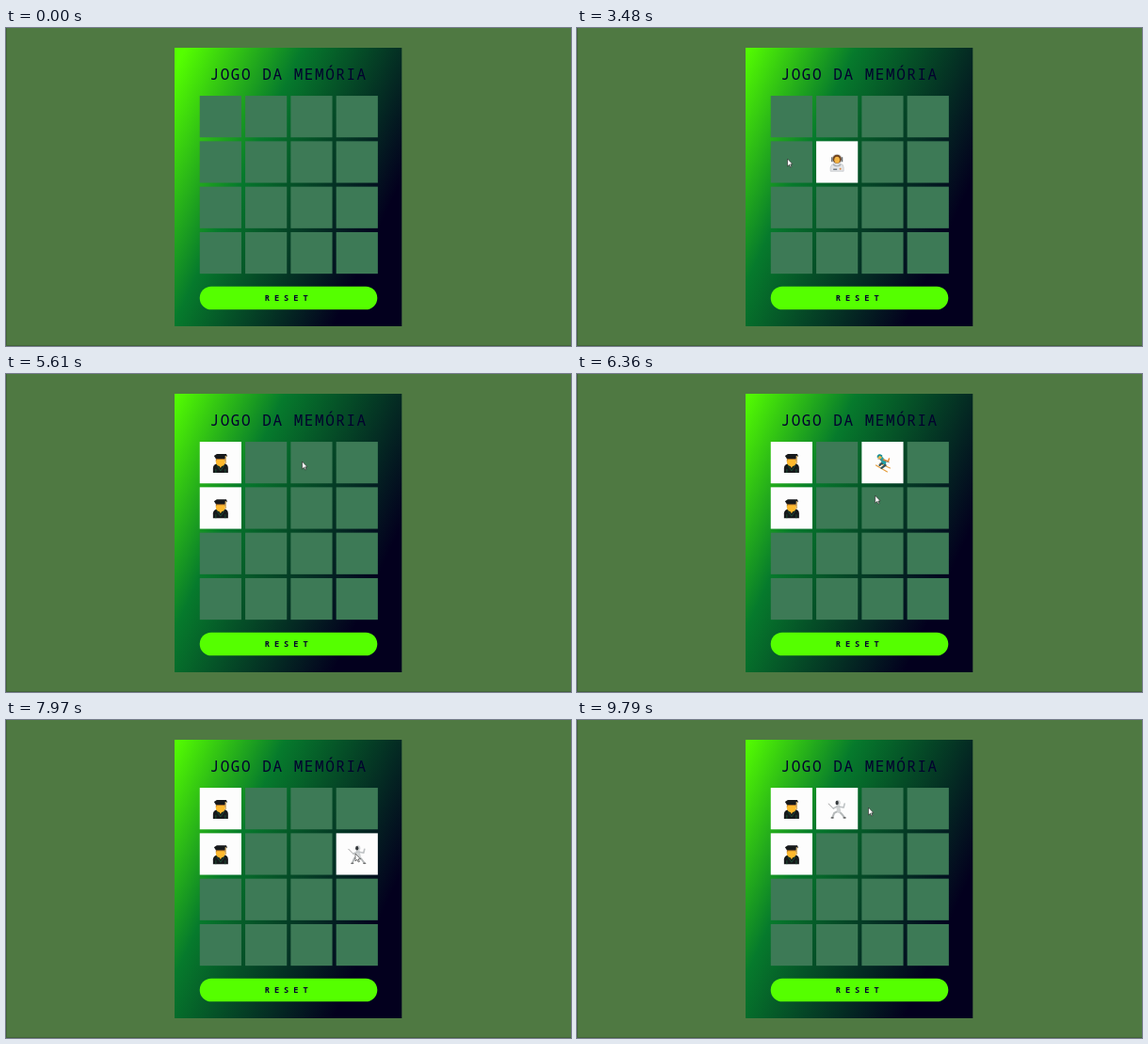
An HTML page that plays this animation: 600x338 px, repeating every 10000 ms.

```html
<!DOCTYPE html>
<html lang="pt">
<head>
<meta charset="utf-8">
<title>Jogo da Memória</title>
<style>
html, body { margin: 0; width: 100%; height: 100%; overflow: hidden; background: #4f7942; }
svg { display: block; width: 600px; height: 338px; }
text { font-family: "Noto Sans Mono", "DejaVu Sans Mono", monospace; fill: #03022e; }
</style>
</head>
<body>
<svg viewBox="0 0 600 338">
  <defs>
    <linearGradient id="panel" gradientUnits="userSpaceOnUse" x1="179" y1="21" x2="490" y2="166">
      <stop id="lime" stop-color="#55ff00"/>
      <stop id="green" stop-color="#067a2c"/>
      <stop offset=".81" stop-color="#03001e"/>
    </linearGradient>

    <g id="graduate">
      <path d="M-8 10V5Q-8 1 -3 0H4Q8 1 8 5V10Z" fill="#17191b"/>
      <path d="M-3 0L0 5L3 0Z" fill="#f4b52e"/>
      <path d="M-4 2L0 8L4 2M-5 6V10M5 6V10" fill="none" stroke="#1d5a3b" stroke-width=".8"/>
      <rect x="-5" y="-7" width="10" height="10" rx="4.5" fill="#ffb92e"/>
      <path d="M-5 -2V-6H5V-2L4 -4H-4Z" fill="#a66a24"/>
      <path d="M-7 -8L-4 -10H6L7 -8L5 -5H-5Z" fill="#17191b"/>
      <path d="M5.5 -8V0" stroke="#d8b676" stroke-width="1.4"/>
    </g>

    <g id="astronaut">
      <path d="M-7 9V5Q-6 1 -3 1H3Q7 1 7 5V9Z" fill="#e3e5e7" stroke="#b7bbc0" stroke-width=".6"/>
      <circle cy="-4" r="5.6" fill="#d5d8db"/>
      <circle cy="-4" r="4.6" fill="#6f431f"/>
      <ellipse cy="-3" rx="2.9" ry="3.5" fill="#f4b545"/>
      <path d="M-5.4 -6V-1M5.4 -6V-1" stroke="#666d73" stroke-width="1.4"/>
      <path d="M-4 2Q0 5 4 2" fill="none" stroke="#a2a8ae" stroke-width="1.2"/>
      <path d="M-4 7H0" stroke="#6c7780" stroke-width="1.4"/>
      <circle cx="3.5" cy="6.5" r="1" fill="#df8a41"/>
    </g>

    <g id="skier" fill="none" stroke-linecap="round">
      <path d="M-7 2L5 9M-3 0L8 5" stroke="#e59b3a" stroke-width="1.1"/>
      <path d="M1 -1L3 2L-1 5M0 -1L-3 2" stroke="#33535d" stroke-width="2.2"/>
      <path d="M-1 -5L2 -1" stroke="#20a2a5" stroke-width="4"/>
      <path d="M1 -4L6 -2L7 -5" stroke="#e98b32" stroke-width="1.5"/>
      <path d="M-5 -5L7 -1" stroke="#777" stroke-width=".7"/>
      <circle cx="-3" cy="-7" r="2.3" fill="#f4b647"/>
      <path d="M-5 -7Q-4 -10 -1 -8" stroke="#168f96" stroke-width="1.8"/>
    </g>

    <g id="mage">
      <path d="M-7 11L-5 2Q0 -1 5 2L7 11Z" fill="#3aa5a4"/>
      <circle cy="-1" r="4" fill="#f6bd53"/>
      <path d="M-4 0Q0 2 4 0L3 7L0 11L-3 7Z" fill="#f2f3ef" stroke="#ced5d2" stroke-width=".5"/>
      <path d="M-9 -2Q-8 -5 -4 -5L-4 -9L2 -10L5 -5Q8 -5 9 -2Q0 -5 -9 -2Z" fill="#15898f"/>
      <path d="M-4 -5Q0 -6 5 -5" fill="none" stroke="#d2a849"/>
      <path d="M7 -4V9" stroke="#a86e32" stroke-width="1.1"/>
      <circle cx="7" cy="-5" r="1.7" fill="#58c7cb"/>
    </g>

    <g id="fencer" fill="none" stroke-linecap="round" stroke-linejoin="round">
      <path d="M-9 -6L-4 -1" stroke="#888" stroke-width=".8"/>
      <path d="M1 2L-3 4L-5 9M2 2L5 5L8 9" stroke="#b4b8b9" stroke-width="2"/>
      <path d="M1 -3L2 2" stroke="#d0d3d4" stroke-width="4"/>
      <path d="M0 -3L-4 -1M2 -3L7 -2L8 -6" stroke="#bfc3c5" stroke-width="1.6"/>
      <path d="M-6 9H-4M7 9H9" stroke="#555" stroke-width="1.2"/>
      <ellipse cx="1" cy="-7" rx="2.6" ry="2.9" fill="#d3d5d6"/>
      <ellipse cx="0" cy="-7" rx="1.6" ry="2.3" fill="#34383b"/>
    </g>
  </defs>

  <rect width="600" height="338" fill="#4f7942"/>
  <path d="M.5 0V337.5H600" fill="none" stroke="#416337"/>
  <rect x="179" y="21" width="241.3" height="296" fill="url(#panel)"/>
  <text x="216.5" y="55" font-size="16" font-weight="500" letter-spacing="1.55">JOGO DA MEMÓRIA</text>
  <g id="cards"></g>
  <rect x="205.7" y="274.7" width="188.6" height="24.6" rx="12.3" fill="#55ff00"/>
  <text x="274.8" y="290.2" font-size="8.6" font-weight="600" letter-spacing="5">RESET</text>
  <path id="cursor" d="M0 0V8L2 6.3L3.2 9L4.4 8.5L3.2 5.8H5.5Z" fill="#fff" stroke="#222" stroke-width=".6"/>
</svg>
<script>
const LOOP = 10000, FLIP = 250, WAIT = 500, TRAVEL = 400, LEAD = 60;
const LEFT = 203.7, TOP = 70, PITCH = 48.3, SIZE = 44.2;
const el = id => document.getElementById(id);

const figures = {
  0: 'graduate', 1: 'fencer', 2: 'skier',
  4: 'graduate', 5: 'astronaut', 6: 'mage', 7: 'fencer'
};

const at = (time, x, y) => ({ time, x, y });
const clicks = [
  at(2640, 277, 139), at(3510, 223.5, 139), at(4580, 223.5, 139),
  at(5050, 229, 98), at(5640, 314.5, 93), at(6670, 318, 152),
  at(7700, 371, 142), at(8610, 279, 142), at(9360, 287, 107)
];
const entry = at(1640, 600, 18);
const stops = [entry, at(1880, 471.5, 43), ...clicks, at(9850, 309.5, 93)];

const clamp = x => Math.max(0, Math.min(1, x));
const easeOut = x => 1 - (1 - clamp(x)) ** 2;
const mix = (a, b, k) => a + (b - a) * k;

// Play the game: two different cards turn back after a wait.
function play() {
  const flips = [];
  let first = null;
  for (const { time, x, y } of clicks) {
    const cell = Math.floor((y - TOP) / PITCH) * 4 + Math.floor((x - LEFT) / PITCH);
    const flip = { cell, open: time, close: LOOP };
    flips.push(flip);
    if (first && figures[first.cell] !== figures[cell]) first.close = flip.close = time + WAIT;
    first = first ? null : flip;
  }
  return flips;
}

function add(parent, tag, attrs) {
  const node = document.createElementNS('http://www.w3.org/2000/svg', tag);
  for (const key in attrs) node.setAttribute(key, attrs[key]);
  return parent.appendChild(node);
}

const flips = play();
const cards = Array.from({ length: 16 }, (_, cell) => {
  const x = LEFT + PITCH * (cell % 4 + .5), y = TOP + PITCH * (Math.floor(cell / 4) + .5);
  const group = add(el('cards'), 'g', { transform: `translate(${x} ${y})` });
  const body = add(group, 'g', {});
  const face = add(body, 'rect', { x: -SIZE / 2, y: -SIZE / 2, width: SIZE, height: SIZE });
  const icon = add(body, 'use', { y: .8, href: '#' + figures[cell] });
  return { body, face, icon, flips: flips.filter(f => f.cell === cell) };
});

function drawCard({ body, face, icon, flips }, t) {
  const open = flips.reduce((sum, f) =>
    sum + easeOut((t - f.open) / FLIP) - easeOut((t - f.close) / FLIP), 0);
  const shown = open > .5;
  body.setAttribute('transform', `scale(${Math.abs(Math.cos(Math.PI * open))} 1)`);
  face.setAttribute('fill', shown ? '#fdfdfd' : '#3d7a56');
  icon.setAttribute('visibility', shown ? 'visible' : 'hidden');
}

function drawCursor(t) {
  let { x, y } = entry;
  stops.slice(1).forEach((stop, i) => {
    const end = stop.time - LEAD;
    const begin = Math.max(stops[i].time, end - TRAVEL);
    const k = easeOut((t - begin) / (end - begin));
    x = mix(x, stop.x, k);
    y = mix(y, stop.y, k);
  });
  el('cursor').setAttribute('transform', `translate(${x} ${y})`);
  el('cursor').setAttribute('visibility', t < entry.time ? 'hidden' : 'visible');
}

function draw(t) {
  cards.forEach(card => drawCard(card, t));
  drawCursor(t);
  const dim = easeOut((t - clicks[0].time) / 700);
  el('lime').setAttribute('offset', mix(.03, 0, dim));
  el('green').setAttribute('offset', mix(.36, .31, dim));
}

const start = performance.now();
function tick() {
  draw((performance.now() - start) % LOOP);
  requestAnimationFrame(tick);
}
tick();
</script>
</body>
</html>
```
